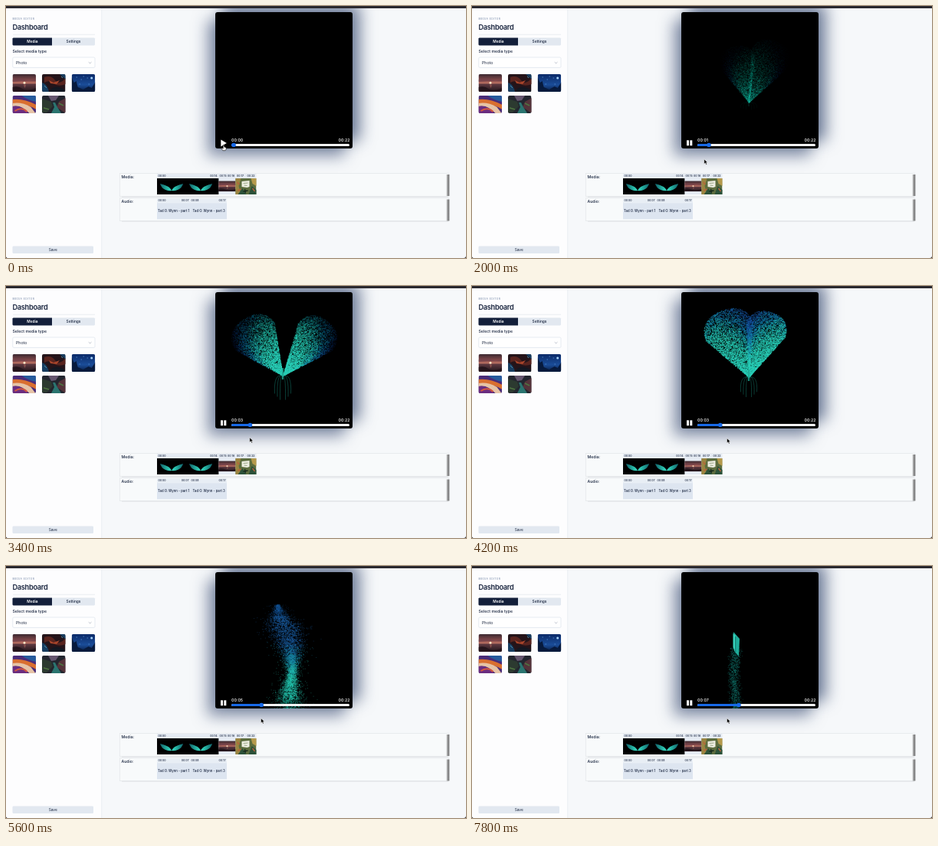
An HTML page with a canvas that plays this animation: 600 px wide and 329 px high, repeating every 8000 ms.

```html
<!DOCTYPE html>
<html lang="en">
<head>
<meta charset="utf-8">
<title>Media editor</title>
<style>
html, body { margin: 0; width: 100%; height: 100%; overflow: hidden; background: #222126; }
#stage { position: relative; width: 600px; height: 329px; overflow: hidden; background: #f6f8fa; border-radius: 0 0 3px 3px; }
#stage > * { position: absolute; left: 0; top: 0; }
#player { left: 273px; top: 8px; width: 179px; height: 178px; border-radius: 3px; background: #000;
  box-shadow: 10px -10px 20px rgba(30, 52, 95, .6), -10px 10px 20px rgba(30, 52, 95, .52); }
canvas { width: 600px; height: 329px; }
#bar { width: 600px; height: 3px; background: #2a292f; }
text { font-family: Inter, sans-serif; fill: #17233d; }
.mid { text-anchor: middle; }
.end { text-anchor: end; }
.time { font-size: 3.5px; font-weight: 500; }
.track { font-size: 4.25px; font-weight: 500; }
.clock { font-size: 5.3px; font-weight: 500; fill: #fff; }
</style>
</head>
<body>
<div id="stage">
  <div id="player"></div>
  <svg width="600" height="329" viewBox="0 0 600 329">
    <defs>
      <clipPath id="round"><rect width="30.5" height="23" rx="2"/></clipPath>
      <linearGradient id="dusk" x2="0" y2="1">
        <stop stop-color="#3b2931"/><stop offset=".35" stop-color="#84484a"/>
        <stop offset=".5" stop-color="#b86f61"/><stop offset=".58" stop-color="#5c3840"/>
        <stop offset="1" stop-color="#22161b"/>
      </linearGradient>
      <linearGradient id="night" x2="0" y2="1">
        <stop stop-color="#0b2a68"/><stop offset=".6" stop-color="#1b4d99"/><stop offset="1" stop-color="#071b42"/>
      </linearGradient>
      <linearGradient id="edge">
        <stop stop-color="#555" stop-opacity="0"/><stop offset=".6" stop-color="#555" stop-opacity=".85"/>
        <stop offset="1" stop-color="#555" stop-opacity=".1"/>
      </linearGradient>
      <linearGradient id="wing">
        <stop stop-color="#12606a"/><stop offset=".3" stop-color="#25b3a2"/><stop offset=".5" stop-color="#3cdcc4"/>
        <stop offset=".7" stop-color="#25b3a2"/><stop offset="1" stop-color="#12606a"/>
      </linearGradient>
      <g id="sunset">
        <rect width="30.5" height="23" fill="url(#dusk)"/>
        <path d="M0 7Q9 4 16 7T31 6V9Q18 8 0 10Z" fill="#71404a" opacity=".7"/>
        <circle cx="15.500" cy="11.200" r="1.500" fill="#ffe8c8"/>
        <path d="M14.500 13.500h3l-1 4h-1Z" fill="#a8635a" opacity=".6"/>
        <path d="M0 17Q8 15 13 19T31 18V23H0Z" fill="#25151c"/>
      </g>
      <path id="moth" d="M0 5Q-2-1-15-4Q-14 1-8 4-3 6 0 5Q3 6 8 4 14 1 15-4 2-1 0 5Z" fill="url(#wing)"/>
    </defs>

    <rect width="124.500" height="329" fill="#fdfdfe"/>
    <path d="M124.800 0V329" stroke="#e6eaf0" stroke-width=".7"/>
    <text x="8.500" y="18" font-size="3.300" letter-spacing=".45" font-weight="500" style="fill:#8797b3">MEDIA EDITOR</text>
    <text x="8.500" y="31" font-size="9.200" font-weight="600" letter-spacing="-.28">Dashboard</text>
    <path d="M9 37.300H116" stroke="#e2e8f0" stroke-width=".7"/>
    <path d="M60 41.500H9.500L8.500 42.500V50.500L9.500 51.500H60Z" fill="#131f3a"/>
    <path d="M60 41.500H115L116 42.500V50.500L115 51.500H60Z" fill="#e2e8f0"/>
    <text class="mid" x="34.500" y="48.300" font-size="4.800" font-weight="600" style="fill:#fff">Media</text>
    <text class="mid" x="88" y="48.300" font-size="4.800" font-weight="500">Settings</text>
    <text x="8.500" y="61.300" font-size="5.200" font-weight="500">Select media type</text>
    <rect x="8.800" y="67" width="107.200" height="13.500" rx="1.500" fill="#fff" stroke="#dce3ec" stroke-width=".7"/>
    <text x="13" y="75.700" font-size="5.200">Photo</text>
    <path d="M107.800 73.200l1.800 1.700 1.800-1.700" fill="none" stroke="#8a94a6" stroke-width=".6"/>

    <g transform="translate(8.500 89)" clip-path="url(#round)"><use href="#sunset"/></g>
    <g transform="translate(47 89)" clip-path="url(#round)">
      <rect width="30.500" height="23" fill="#24141a"/>
      <path d="M3 4Q12 1 17 8T31 5V13Q21 17 15 12T3 11Z" fill="#59241f"/>
      <path d="M9 8l6 3 8-3-4 5-8-1Z" fill="#a8452b"/>
      <path d="M0 11Q7 13 9 23H0ZM23 0h8v7Z" fill="#173d60"/>
      <path d="M9 23Q14 15 22 17T31 23Z" fill="#121722"/>
      <path d="M3 15l3 3M25 3l2 2" stroke="#4f8ba3" stroke-width="1"/>
    </g>
    <g transform="translate(85.700 89)" clip-path="url(#round)">
      <rect width="30.500" height="23" fill="url(#night)"/>
      <path d="M0 23V4l3 7 3-2 2 8 7 3 7-4 4 2 5-8V23Z" fill="#071a3d"/>
      <circle cx="26" cy="5" r="1.500" fill="#a9d5ff"/>
      <path d="M6 4h1M12 7h1M20 5h1M10 13h1M22 13h1M15 3h1" stroke="#77b9f5" stroke-width=".8"/>
    </g>
    <g transform="translate(8.500 117)" clip-path="url(#round)">
      <rect width="30.500" height="23" fill="#4a2c78"/>
      <path d="M0 5Q14 3 31 12V18Q16 9 0 13Z" fill="#d96f30"/>
      <path d="M0 10Q12 8 24 15L30 23H22Q11 11 0 14Z" fill="#e6c3a6"/>
      <path d="M0 14Q12 12 20 23H0Z" fill="#6a2d80"/>
      <path d="M12 0Q20 6 31 8V0Z" fill="#265a9c"/>
      <path d="M3 20Q12 14 19 21" fill="none" stroke="#d2573f" stroke-width="2"/>
    </g>
    <g transform="translate(47 117)" clip-path="url(#round)">
      <rect width="30.500" height="23" fill="#23262f"/>
      <path d="M8 0h14l-4 6-6 1Z" fill="#65566f"/>
      <path d="M0 4l12 4 2 6-8 8H0Z" fill="#2c3a30"/>
      <path d="M31 3l-9 5-3 7 12 8Z" fill="#55333a"/>
      <path d="M14 9h3l3 6 5 8H12l4-8Z" fill="#2a746f"/>
      <path d="M2 16l7 2M22 10l6 3" stroke="#4d7440" stroke-width="1.600"/>
    </g>
    <rect x="8.500" y="313.500" width="105.500" height="9.500" rx="1.300" fill="#e2e8f0"/>
    <text class="mid" x="61.200" y="320" font-size="4.800">Save</text>

    <g fill="#f8fafb" stroke="#e3e5e9" stroke-width=".7">
      <rect x="148.500" y="218.500" width="429" height="30"/>
      <rect x="148.500" y="250.800" width="429" height="29.700"/>
    </g>
    <path d="M151 249.200H577M151 281.200H577" stroke="#d9dbdf" stroke-width="1" opacity=".7"/>
    <path d="M574 220h5v28h-5ZM574 252.500h5v28h-5Z" fill="url(#edge)"/>
    <text x="150.500" y="225.200" font-size="5.200" font-weight="500">Media:</text>
    <text x="150.500" y="257.200" font-size="5.200" font-weight="500">Audio:</text>

    <rect x="197" y="219" width="129.300" height="27" fill="#e5ebf3"/>
    <rect x="197" y="225" width="80.300" height="21" fill="#000"/>
    <use href="#moth" x="216" y="236"/>
    <use href="#moth" x="254" y="236"/>
    <use href="#sunset" transform="translate(277.300 228.500) scale(.72 .59)"/>
    <g transform="translate(299.500 225)">
      <rect width="26.700" height="21" fill="#5d6d3f"/>
      <path d="M0 0h7L4 10l3 11H0Z" fill="#9a8440"/>
      <path d="M20 0h7v10l-5-3Z" fill="#b59a4c"/>
      <path d="M3 21l6-8 5 8ZM17 21l4-11 6 5v6Z" fill="#2c5139"/>
      <path d="M2 5l3 3M22 13l3 4M3 16l4-2" stroke="#b8623c" stroke-width="1.400"/>
      <path d="M8 4l10-1v8l-3 1-7-1Z" fill="#eeeee2"/>
      <path d="M10 6.500l6-.5M11 9l4 .5" stroke="#83936b" stroke-width=".8"/>
      <path d="M12 14l1 5M10 17l6-1" stroke="#16281d" stroke-width="1.300"/>
    </g>
    <rect x="197" y="251.500" width="91" height="6" fill="#e8eef5"/>
    <rect x="197" y="257.300" width="91" height="21" fill="#dde5f0"/>
    <g class="time">
      <text x="198.500" y="223.200">00:00</text><text class="end" x="275.500" y="223.200">00:14</text>
      <text x="278.500" y="223.200">00:15</text><text class="end" x="298.200" y="223.200">00:16</text>
      <text x="301" y="223.200">00:17</text><text class="end" x="324.500" y="223.200">00:22</text>
      <text x="198.500" y="255.400">00:00</text><text class="end" x="238.500" y="255.400">00:07</text>
      <text x="241.500" y="255.400">00:08</text><text class="end" x="286.500" y="255.400">00:17</text>
    </g>
    <text class="track" x="198" y="269">Tad O. Wynn - part 1</text>
    <text class="track" x="243.500" y="269">Tad O. Wynn - part 3</text>
  </svg>

  <div id="bar"></div>
  <canvas id="view"></canvas>

  <svg width="600" height="329" viewBox="0 0 600 329">
    <text id="now" class="clock" x="294" y="176.700">00:00</text>
    <text class="clock end" x="448.500" y="176.700">00:22</text>
    <g id="arrow">
      <path d="M0 0V6.300L1.500 5 2.600 7.400 3.700 6.900 2.700 4.600H4.600Z" fill="#000" stroke="#fff" stroke-width=".5"/>
    </g>
    <g id="hand">
      <path d="M-.8 .2Q0-.7.7.2V2.500L3.200 3.300V5.500L2.200 7.200H-1.200L-3 4.600-2.300 3.800-.8 4.700Z" fill="#fff" stroke="#000" stroke-width=".6"/>
    </g>
  </svg>
</div>
<script>
const LOOP = 8000, STEP = 200, START = 0.22, LENGTH = 22;
const $ = id => document.getElementById(id);
const canvas = $('view'), ctx = canvas.getContext('2d');
const ratio = window.devicePixelRatio || 1;
canvas.width = 600 * ratio;
canvas.height = 329 * ratio;
ctx.scale(ratio, ratio);

let seed = 71;
const rand = () => (seed = (seed * 16807) % 2147483647) / 2147483647;
const lerp = (a, b, k) => a + (b - a) * k;
const clamp = v => Math.min(1, Math.max(0, v));

// Keys are rows of [position, ...values].
function sample(keys, t) {
  if (t <= keys[0][0]) return keys[0].slice(1);
  for (let i = 1; i < keys.length; i++) {
    const a = keys[i - 1], b = keys[i];
    if (t <= b[0]) {
      const k = (t - a[0]) / (b[0] - a[0]);
      return a.slice(1).map((v, j) => lerp(v, b[j + 1], k));
    }
  }
  return keys[keys.length - 1].slice(1);
}

// base x, y, left angles and reach, right angles and reach, legs, opacity
const WINGS = [
  [1.2, 362, 128, 84, 126, 70, 46, 87, 78, 8, 0],
  [2.0, 361, 126, 82, 130, 76, 42, 88, 88, 10, .16],
  [3.4, 361, 117, 99, 152, 90, 27, 74, 92, 34, 1],
  [4.2, 361, 119, 86, 140, 94, 48, 93, 90, 28, .95],
  [5.0, 366, 134, 86, 118, 88, 66, 94, 84, 16, .55],
  [5.5, 371, 145, 88, 106, 85, 78, 92, 82, 5, 0]
];
const DRIFT = [[4.3, -6, -14, 0], [5.2, -2, -4, .7], [5.6, 0, 0, 1], [6.0, 5, -8, .4], [6.4, 12, -18, .04], [6.7, 14, -22, 0]];
const RISE = [[6.6, 182, 0], [7.0, 162, .6], [7.8, 101, 1]];
const POINTER = [[0.3, 284, 181.5], [0.8, 286, 184], [1.6, 302.5, 200], [2.4, 303, 199.8], [3.4, 317.8, 197.7], [4.0, 332.5, 198.7]];
// y, centre x, half width
const PLUME = [[50, 354, 3], [65, 356, 16], [80, 363, 28], [95, 368, 24], [115, 372, 17], [133, 373, 9], [145, 372, 9], [160, 370, 16], [186, 368, 27]];

const dust = Array.from({ length: 12000 }, (_, i) => ({
  left: i % 2 === 0, s: rand() * 2 - 1, r: Math.pow(rand(), .66), light: .35 + rand() * .65
}));
const smoke = Array.from({ length: 6500 }, () => ({
  u: rand(), w: (rand() + rand() + rand()) * 2 / 3 - 1, light: .25 + rand() * .7
}));

function dot(x, y, size, color, alpha) {
  ctx.globalAlpha = clamp(alpha);
  ctx.fillStyle = color;
  ctx.fillRect(x, y, size, size);
}

function drawWings(t) {
  const [x, y, l0, l1, lr, r0, r1, rr, legs, alpha] = sample(WINGS, t);
  if (!alpha) return;
  const folded = clamp((t - 3.4) / .8);
  for (const p of dust) {
    const k = (p.s + 1) / 2;
    const a = (p.left ? lerp(l0, l1, k) : lerp(r0, r1, k)) * Math.PI / 180;
    const reach = (p.left ? lr : rr) * (1 - .22 * Math.abs(p.s) ** 3) * p.r;
    const inner = p.left ? -p.s : p.s;
    const face = lerp(inner, -inner, folded);
    const glow = 1 - p.r * .8 + face * .25 + (p.light - .65) * .5;
    const color = glow > .46 ? '#2bcfb8' : glow > .26 ? '#1793b4' : '#1b57a4';
    const open = 1.4 - p.r * (1.2 - face * .15);
    const fade = lerp(open, 1.15 - p.r * .35 + face * .15, folded);
    dot(x + Math.cos(a) * reach, y - Math.sin(a) * reach, 1, color, alpha * p.light * fade);
  }
  ctx.globalAlpha = alpha * .6;
  ctx.strokeStyle = '#1ea894';
  ctx.lineWidth = .6;
  ctx.beginPath();
  for (const i of [-3, -2, -1, 1, 2, 3]) {
    ctx.moveTo(x, y);
    ctx.quadraticCurveTo(x + i * 4, y - legs * .1, x + i * 3.5, y + legs * (1.05 - Math.abs(i) * .12));
  }
  ctx.stroke();
  ctx.globalAlpha = alpha * .85;
  ctx.lineWidth = 2.2;
  ctx.beginPath();
  ctx.moveTo(x, y - 10);
  ctx.lineTo(x, y + 5);
  ctx.stroke();
}

function drawPlume(t) {
  const [dx, dy, alpha] = sample(DRIFT, t);
  if (!alpha) return;
  for (const p of smoke) {
    const y = 50 + p.u * 136;
    const [x, half] = sample(PLUME, y);
    const stray = p.light > .84;
    const warm = y + (p.light - .6) * 40;
    const color = warm > 134 ? '#27c4ae' : warm > 112 ? '#1b8ca8' : '#1d5b9c';
    const core = stray ? .4 : 1.15 - Math.abs(p.w) * .7;
    const ends = y < 65 || y > 174 ? .6 : 1;
    const wide = stray ? 12 + half * 1.5 : half * 1.25;
    dot(x + p.w * wide + dx, y + dy, 1, color, alpha * p.light * core * ends);
  }
}

function drawRise(t) {
  const [y, alpha] = sample(RISE, t);
  if (!alpha) return;
  for (const p of smoke.slice(0, 3000)) {
    const py = y + 5 + p.u * 90;
    if (p.light < .6 || py > 186) continue;
    dot(342.5 + p.w * 11 + Math.sin(py / 13) * 1.2, py, .75, '#1a8d83', alpha * p.light * .65);
  }
  ctx.globalAlpha = alpha;
  ctx.fillStyle = '#1fae9c';
  ctx.fill(new Path2D(`M341 ${y - 15}l8 9 -1 23 -6 -7Z`));
  ctx.fillStyle = '#36d3bd';
  ctx.fill(new Path2D(`M340.500 ${y - 13}l3 3v21l-3 -6Z`));
  ctx.strokeStyle = '#064540';
  ctx.lineWidth = .6;
  ctx.stroke(new Path2D(`M343.700 ${y - 9}v20`));
}

function drawControls(t) {
  const time = Math.max(0, t - START);
  const knob = 297 + 148 * time / LENGTH;
  const pill = (x, w, color) => {
    ctx.fillStyle = color;
    ctx.beginPath();
    ctx.roundRect(x, 180, w, 3, 1.5);
    ctx.fill();
  };
  ctx.globalAlpha = 1;
  pill(294, 154, '#f2f2f2');
  pill(294, knob - 294, '#1769e8');
  ctx.beginPath();
  ctx.arc(knob, 181.5, 2.8, 0, Math.PI * 2);
  ctx.fill();
  ctx.fillStyle = '#fff';
  if (time) {
    ctx.fillRect(280, 175.3, 3, 7);
    ctx.fillRect(284.3, 175.3, 3, 7);
  } else {
    ctx.fill(new Path2D('M280.300 174.500L287.800 179 280.300 183.500Z'));
  }
  $('now').textContent = '00:' + String(Math.floor(time)).padStart(2, '0');
}

function drawPointer(t) {
  const [x, y] = sample(POINTER, t);
  const over = y < 187;
  $('hand').style.display = over ? '' : 'none';
  $('arrow').style.display = over ? 'none' : '';
  $(over ? 'hand' : 'arrow').setAttribute('transform', `translate(${x} ${y})`);
}

function draw(t) {
  ctx.clearRect(0, 0, 600, 329);
  ctx.save();
  ctx.beginPath();
  ctx.roundRect(273, 8, 179, 178, 3);
  ctx.clip();
  drawWings(t);
  drawPlume(t);
  drawRise(t);
  drawControls(t);
  ctx.restore();
  drawPointer(t);
}

let last = -1;
function tick() {
  const step = Math.floor(performance.now() % LOOP / STEP);
  if (step !== last) draw(step * STEP / 1000);
  last = step;
  requestAnimationFrame(tick);
}
tick();
</script>
</body>
</html>
```
